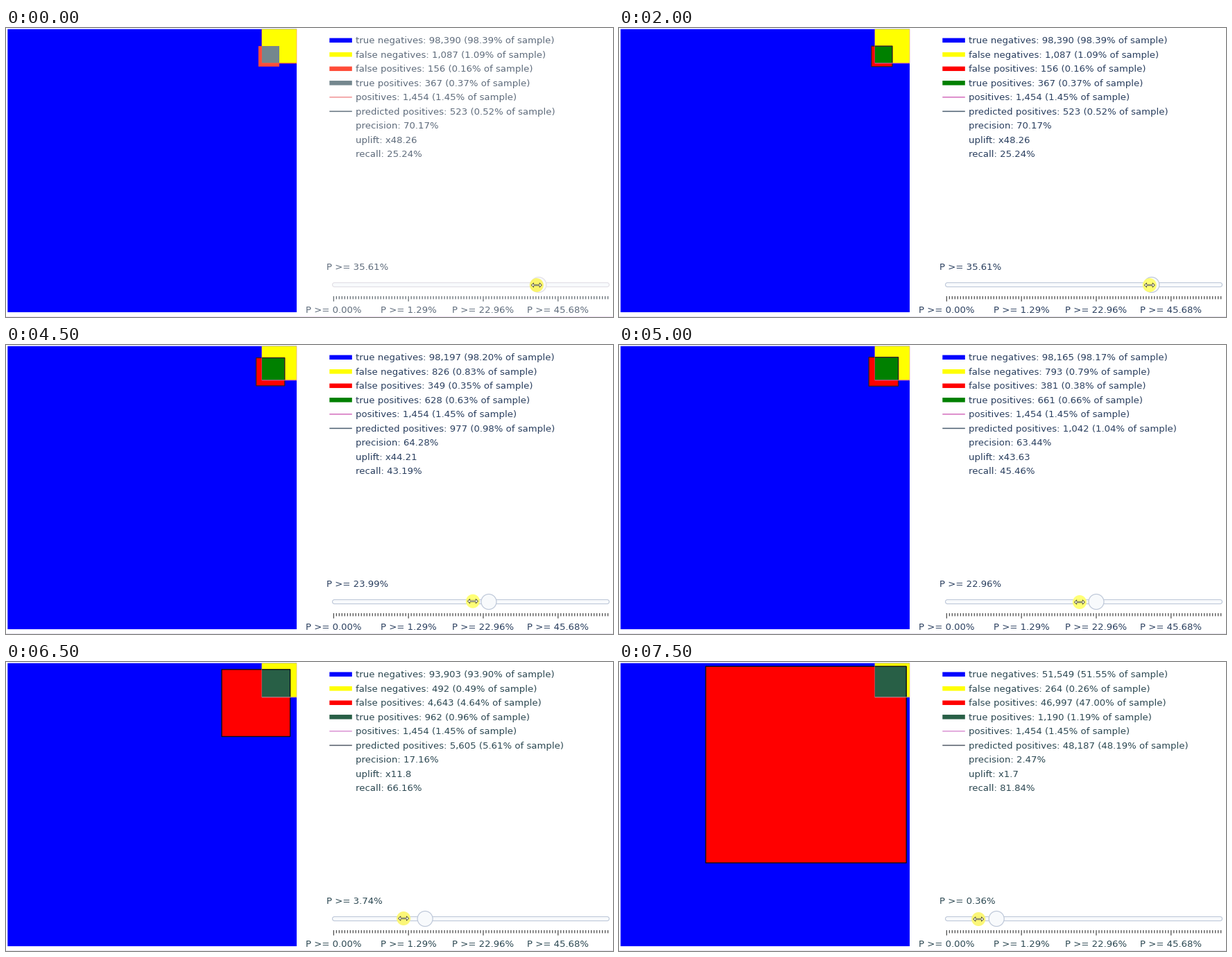
These frames come from a looping animation (875 px wide and 417 px high, 8 s). A matplotlib script:

```python
import numpy as np
import matplotlib.pyplot as plt
from matplotlib.animation import FuncAnimation
from matplotlib.patches import Circle, FancyBboxPatch, Polygon, Rectangle

W, H, DPI = 875, 417, 128
FRAMES, INTERVAL = 16, 500
PX = 72 / DPI

# Sample and plot area
TOTAL, POSITIVES = 100_000, 1454
LEFT, TOP, PLOT_W, PLOT_H = 2.3, 1.6, 416.7, 408.5
RIGHT = LEFT + PLOT_W

# Slider scale: 100 steps
STEPS, X0, STEP_W = 100, 472.3, 3.994

# Slider step reached at each tick of the clock
PATH = [74, 74, 74, 74, 74, 73, 71, 66, 61, 56, 54, 50, 41, 33, 25, 18]

# Known model results by slider step
KEY_STEPS = [18, 25, 41, 54, 66, 74]
KEY_TP = [1190, 1087, 852, 661, 485, 367]
KEY_FP = [46997, 24835, 868, 381, 226, 156]
KEY_P = [0.36, 0.95, 14.74, 22.96, 29.84, 35.61]

# Pointer offset from the handle, and its height
KEY_T = [0, 4, 7, 10, 12, 14, 15]
LAG = [3, 3, 21, 24, 30, 32, 26]
POINTER_Y = [371, 371, 367, 371, 369, 371, 371]

NAMES = ("text", "tn", "fn", "fp", "tp", "pos", "pred", "edge", "pos_edge",
         "border", "tick", "pointer", "base")
PALE = dict(zip(NAMES, (
    "#5f6c7c", "#0000ff", "#ffff00", "#ff4c38", "#74878e", "#f08a8c",
    "#6a7884", "none", "#ff5a3c", "#e2dfe6", "#4c565e", "#fbf560",
    "#f1e2f3")))
FULL = dict(zip(NAMES, (
    "#2a3f5f", "#0000ff", "#ffff00", "#ff0000", "#008000", "#d062b8",
    "#566878", "#33202c", "#d062b8", "#bec8d9", "#333333", "#ffff6a",
    "#e6e4ee")))
DARK = dict(FULL, text="#2c4852", tp="#285f46", pos="#d88ad0",
            pred="#5c6470", edge="#101014", pos_edge="#c890a0",
            pointer="#fbf66c")


def palette(i):
    return PALE if i == 0 else FULL if i < 13 else DARK


def results(step):
    """Interpolate true positives, false positives and the cut-off."""
    def geometric(ys):
        return np.exp(np.interp(step, KEY_STEPS, np.log(ys)))
    return (int(round(geometric(KEY_TP))), int(round(geometric(KEY_FP))),
            geometric(KEY_P))


def tick_x(step):
    return X0 + STEP_W * step


def percent(n):
    return f"{n:,} ({n / TOTAL:.2%} of sample)"


fig = plt.figure(figsize=(W / DPI, H / DPI), dpi=DPI, facecolor="white")
ax = fig.add_axes([0, 0, 1, 1])
ax.set_xlim(0, W)
ax.set_ylim(H, 0)
ax.axis("off")


def text(x, y, s, colour, ha="left"):
    ax.text(x, y, s, color=colour, ha=ha, va="baseline",
            family="DejaVu Sans", size=13.25 * PX)


def line(xs, ys, colour, width=1.0):
    ax.plot(xs, ys, color=colour, lw=width * PX, solid_capstyle="butt",
            snap=False)


def box(x, y, w, h, face="none", edge="none", width=0.0):
    ax.add_patch(Rectangle((x, y), w, h, fc=face, ec=edge, lw=width * PX,
                           joinstyle="miter", snap=False))


def draw_squares(tp, fp, c):
    def size(n):
        k = np.sqrt(n / TOTAL)
        return PLOT_W * k, PLOT_H * k

    pw, ph = size(POSITIVES)
    tw, th = size(tp)
    qw, qh = size(tp + fp)
    px, bottom = RIGHT - pw, TOP + ph
    right, top = px + tw, bottom - th

    box(LEFT, TOP, PLOT_W, PLOT_H, c["tn"])
    box(px, TOP, pw, ph, c["fn"])
    box(right - qw, top, qw, qh, c["fp"])
    box(px, top, tw, th, c["tp"])
    line([px, RIGHT], [bottom, bottom], c["pos_edge"])
    line([RIGHT, RIGHT], [TOP, bottom], c["pos_edge"], 0.4)
    line([px, px], [TOP, bottom], c["pos_edge"], 0.4)
    box(right - qw, top, qw, qh, edge=c["edge"], width=1.4)


def draw_legend(tp, fp, c):
    precision = tp / (tp + fp)
    uplift = round(precision * TOTAL / POSITIVES, 2)
    fn = POSITIVES - tp
    rows = [
        ("true negatives: " + percent(TOTAL - POSITIVES - fp), "tn", 6.5),
        ("false negatives: " + percent(fn), "fn", 6.5),
        ("false positives: " + percent(fp), "fp", 6.5),
        ("true positives: " + percent(tp), "tp", 6.5),
        ("positives: " + percent(POSITIVES), "pos", 1.4),
        ("predicted positives: " + percent(tp + fp), "pred", 1.6),
        (f"precision: {precision:.2%}", None, 0),
        (f"uplift: x{uplift}", None, 0),
        (f"recall: {tp / POSITIVES:.2%}", None, 0),
    ]
    for n, (label, key, width) in enumerate(rows):
        y = 17.8 + 20.5 * n
        if key:
            line([466.3, 498.8], [y, y], c[key], width)
        text(504, y + 4.4, label, c["text"])


def draw_pointer(x, y, c):
    ax.add_patch(Circle((x, y), 10, fc=c["pointer"], ec="none", alpha=0.92))
    half = [(-7.5, 0), (-4.2, -3.2), (-4.2, -0.8)]
    pts = half + [(-u, v) for u, v in half[::-1]]
    pts += [(-u, -v) for u, v in half[1:]] + [(u, -v) for u, v in half[:0:-1]]
    ax.add_patch(Polygon([(x + u, y + v) for u, v in pts], fc="#fffff0",
                         ec="#333322", lw=0.7 * PX))


def draw_slider(i, p, c):
    text(462, 349, f"P >= {p:.2f}%", c["text"])
    ax.add_patch(FancyBboxPatch(
        (470.5, 367.5), 399, 6, boxstyle="round,pad=0,rounding_size=3",
        fc="#f8fafc", ec=c["border"], lw=1.1 * PX))

    labels = {0: "0.00", 27: "1.29", 54: "22.96", 81: "45.68"}
    for k in range(STEPS):
        x = tick_x(k)
        line([x, x], [387, 394.5 if k in labels else 391.3], c["tick"], 1.1)
        if k in labels:
            text(x, 411, f"P >= {labels[k]}%", c["text"], "center")

    x = tick_x(PATH[i])
    ax.add_patch(Circle((x, 370.5), 11, fc="#f8fafc", ec=c["border"],
                        lw=1.2 * PX))
    draw_pointer(x - np.interp(i, KEY_T, LAG),
                 np.interp(i, KEY_T, POINTER_Y), c)


def draw(i):
    for artist in list(ax.patches) + list(ax.lines) + list(ax.texts):
        artist.remove()
    c = palette(i)
    tp, fp, p = results(PATH[i])
    draw_squares(tp, fp, c)
    draw_legend(tp, fp, c)
    draw_slider(i, p, c)
    line([0, W], [416.5, 416.5], c["base"])
    return []


anim = FuncAnimation(fig, draw, frames=FRAMES, interval=INTERVAL,
                     init_func=lambda: [], repeat=True, repeat_delay=0)
plt.show()
```
